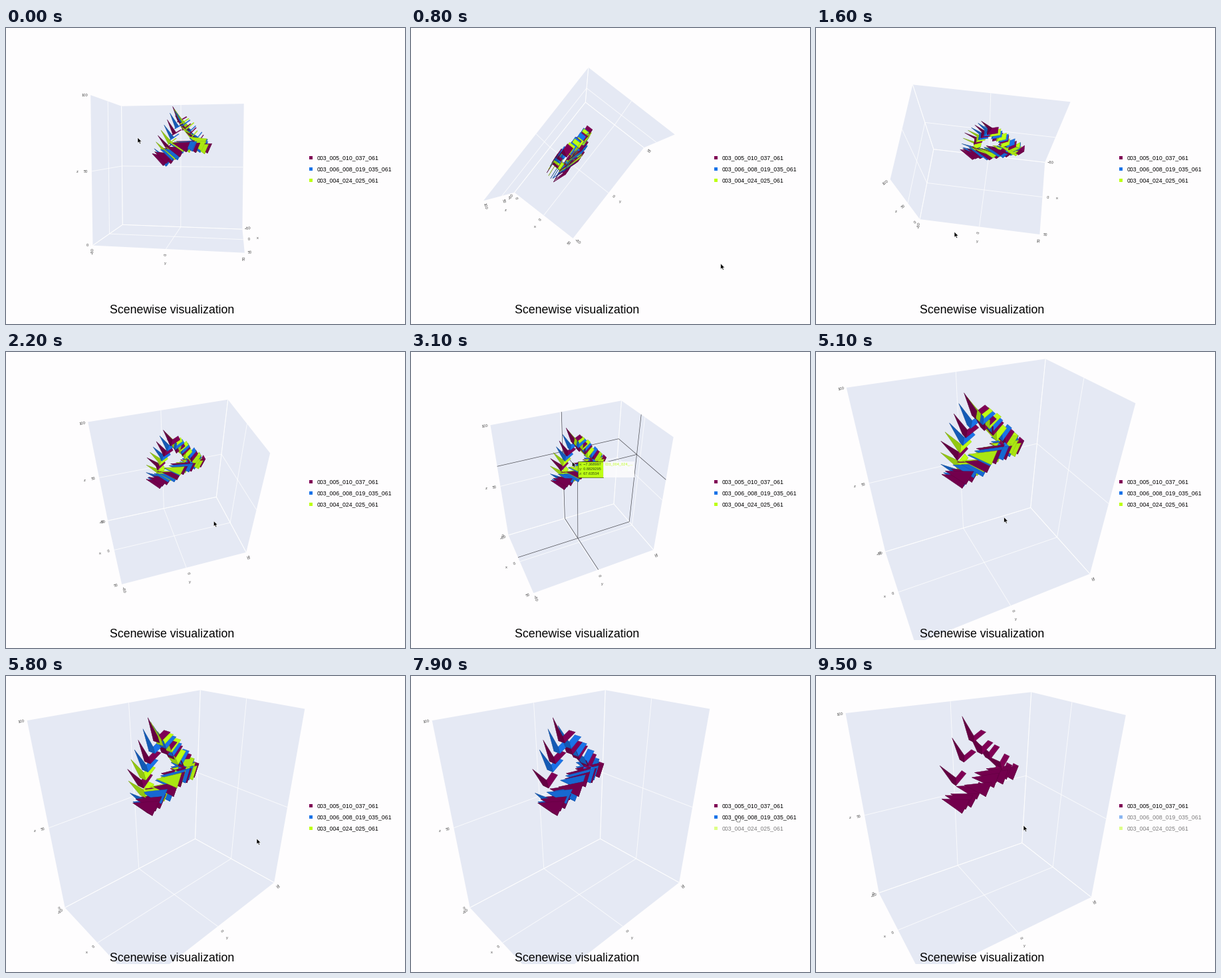
Recreate the animation shown at these times as a matplotlib script. Size 600 by 446 pixels, loop 9600 ms.

```python
import numpy as np
import matplotlib.pyplot as plt
from matplotlib.animation import FuncAnimation
from matplotlib.collections import LineCollection, PolyCollection
from matplotlib.colors import to_rgb
from matplotlib.patches import Polygon, Rectangle

W, H, DPI, STEP, FRAMES = 600, 446, 100, 100, 96
PX = 72 / DPI
SERIES = {"maroon": "#800055", "blue": "#1a73e8", "green": "#bdff14"}
NAMES = ["003_005_010_037_061", "003_006_008_019_035_061", "003_004_024_025_061"]
HIDDEN_AT = {"maroon": 1e9, "blue": 8700, "green": 7400}

# ---- pointer path; the turntable camera follows it while dragging ----
PATH = np.array([
    (100, 198, 165), (700, 473, 330), (1000, 451, 405), (1600, 208, 307), (2400, 347, 237),
    (2800, 243, 165), (4400, 239, 165), (4600, 206, 188), (5200, 298, 261), (5800, 377, 245),
    (6100, 377, 245), (7000, 488, 229), (7400, 490, 211), (8700, 490, 211), (8900, 363, 226),
    (9200, 322, 226), (9300, 322, 226), (9500, 312, 225)])
DRAGS = [(0, 2400), (5200, 5800), (8900, 9500)]
CENTRE, FOCAL = np.array([253, 212.5]), 534.8
BOX = np.array([0.645, 1, 1])


def pointer_at(t):
    return np.array([np.interp(t, PATH[:, 0], PATH[:, i]) for i in (1, 2)])


class Camera:
    def __init__(self, t):
        dx, dy = sum(pointer_at(np.clip(t, a, b)) - pointer_at(a) for a, b in DRAGS)
        az = np.radians(9.6 - 0.23 * dx)
        el = np.radians(np.clip(3.6 + 0.46 * dy, 0, 89))
        zoom = np.clip((t - 3100) / 900, 0, 1)
        self.distance = 5.18 * (3.503 / 5.18) ** zoom
        ca, sa, ce, se = np.cos(az), np.sin(az), np.cos(el), np.sin(el)
        self.axes = np.array([(-sa, ca, 0), (se * ca, se * sa, -ce), (ce * ca, ce * sa, se)])
        self.near = 1 if sa > 0 else -1

    def project(self, points):
        """Pixels and depth of points in box units (-1 to 1 on each axis)."""
        q = np.asarray(points, float) * BOX @ self.axes.T
        depth = self.distance - q[..., 2]
        return CENTRE + FOCAL * q[..., :2] / depth[..., None], depth


# ---- markers: a thin spike and a flap, strung along a closed loop ----
LOOP_U = [0, 0.26, 0.64, 1, 2, 3, 5, 6, 7]
LOOP = np.array([  # x, y, z, spike angle
    (-.30, .01, .70, 109), (-.34, -.08, .50, 110), (-.33, -.18, .28, 122),
    (-.22, -.19, .02, 135), (-.21, -.01, .13, 140), (-.17, .15, .25, 148),
    (-.29, .46, .24, 146), (-.26, .19, .50, 125), (-.30, .03, .68, 110)])
facets = []


def facet(series, shade, verts):
    facets.append((series, np.array(verts) / BOX, np.array(to_rgb(SERIES[series])) * shade))


def polar(length, degrees, dx=0):
    a = np.radians(degrees)
    return np.array([dx, length * np.cos(a), length * np.sin(a)])


def marker(series, u, shift=0):
    x, y, z, angle = (np.interp(u, LOOP_U, column) for column in LOOP.T)
    base = np.array([x, y, z]) + shift
    across = np.array([0.09, 0, 0])
    tip = base + polar(0.25, angle, 0.03)
    end = base + polar(0.155, angle - 80)
    facet(series, 0.78, [tip, base, base + across, base + 0.4 * (end - base)])
    facet(series, 1, [base, end, end + across, base + across])
    if 0.95 < u < 5.5:
        facet(series, 0.9, [tip, end + across, base + across])


for u, name in zip(np.linspace(0, 0.88, 8), "maroon blue maroon blue green maroon green blue".split()):
    marker(name, u)
rng = np.random.default_rng(4)
for i, u in enumerate(np.linspace(1, 6.85, 36)):
    name = list(SERIES)[i % 3]
    if u < 1.5 and i % 2 == 0:
        name = "maroon"
    marker(name, u, rng.uniform(-0.025, 0.025, 3))

# ---- stage ----
plt.rcParams["font.family"] = "Liberation Sans"
fig = plt.figure(figsize=(W / DPI, H / DPI), dpi=DPI, facecolor="#fefdfe")
ax = fig.add_axes([0, 0, 1, 1])
ax.set(xlim=(0, W), ylim=(H, 0))
ax.axis("off")
window = Rectangle((0, 0), W, 434, transform=ax.transData)


def text(x, y, s, px, **kw):
    return ax.text(x, y, s, fontsize=px * PX, **kw)


def layer(artist):
    ax.add_collection(artist, autolim=False)
    artist.set_clip_path(window)
    return artist


walls = layer(PolyCollection([], facecolors="#e5e9f4", edgecolors="none", zorder=1))
grid = layer(LineCollection([], colors="white", linewidths=PX, alpha=0.75, zorder=2))
spikes = layer(LineCollection([], colors="#4a4a50", linewidths=0.7 * PX, zorder=3))
meshes = layer(PolyCollection([], linewidths=0.4 * PX, zorder=4))

TICK_TEXT = {"x": ["−50", "0", "50", "x"], "y": ["−50", "0", "50", "y"], "z": ["0", "50", "100", "z"]}
ticks = {axis: [text(0, 0, s, 5.8, color="#444", ha="center", va="center",
                     rotation_mode="anchor", zorder=5) for s in labels]
         for axis, labels in TICK_TEXT.items()}

text(155.7, 429.7, "Scenewise visualization", 17.7, color="black", zorder=8)
legend = {}
for row, (name, label) in enumerate(zip(SERIES, NAMES)):
    y = 195.3 + 17.2 * row
    box = ax.add_patch(Rectangle((456, y - 2.7), 5.4, 5.4, fc=SERIES[name], ec="none", zorder=6))
    legend[name] = box, text(467.4, y + 2.9, label, 8.8, color="black", zorder=6)

HOVERS = [  # start, end, series, x, y, z
    (2800, 3600, "green", -7.368997, 0.8829295, 67.63534),
    (3600, 4500, "maroon", -9.286622, -0.6715211, 66.31049),
    (4500, 5100, "maroon", -6.120348, -16.20417, 56.10732),
]
tip_box = ax.add_patch(Rectangle((0, 0), 38, 24, lw=0.6 * PX, zorder=9))
tip_side = ax.add_patch(Rectangle((0, 0), 47, 24, fc="#fdfdfe", ec="none", alpha=0.85, zorder=9))
tip_rows = [text(0, 0, "", 5.6, va="center", zorder=10) for _ in "xyz"]
tip_name = text(0, 0, "", 5.6, va="center", zorder=10)

ARROW = np.array([(0, 0), (0, 8.4), (1.9, 6.7), (3.3, 9.6), (4.7, 9), (3.4, 6.2), (6, 6.1)])
HAND = np.array([(0, 0), (1.4, 0), (1.5, 3.2), (5.6, 4), (4.6, 9), (0.6, 9), (-2, 5.4), (0, 5.8)])
pointer = ax.add_patch(Polygon(ARROW, closed=True, lw=0.6 * PX, zorder=12))


def wall_lines(p, side):
    x, y, z = p
    return [[(-1, y, -1), (-1, y, 1)], [(-1, -1, z), (-1, 1, z)],
            [(x, side, -1), (x, side, 1)], [(-1, side, z), (1, side, z)],
            [(x, -1, -1), (x, 1, -1)], [(-1, y, -1), (1, y, -1)]]


def draw_axes(cam):
    centre, near = cam.project((0, 0, 0))[0], cam.near
    edges = {"x": [(v, near, -1) for v in (-1, 0, 1)],
             "y": [(1, v, -1) for v in (-1, 0, 1)],
             "z": [(near, -1, v) for v in (-1, 0, 1)]}
    for axis, points in edges.items():
        q = cam.project(points)[0]
        dx, dy = q[2] - q[0]
        out = np.array([-dy, dx]) / max(np.hypot(dx, dy), 1e-6)
        if out @ (q[1] - centre) < 0:
            out = -out
        angle = (np.degrees(np.arctan2(-out[1], out[0])) + 90) % 180 - 90
        for label, spot in zip(ticks[axis], [*(q + 8.5 * out), q[1] + 22 * out]):
            title = label.get_text() == axis
            label.set(position=spot, visible=spot[1] < 432, rotation=0 if title else angle)


def draw_hover(cam, t):
    hover = next((h for h in HOVERS if h[0] <= t < h[1]), None)
    for part in (tip_box, tip_side, tip_name, *tip_rows):
        part.set_visible(hover is not None)
    if hover is None:
        spikes.set_segments([])
        return
    name, *values = hover[2:]
    x, y, z = p = values[0] / 50, values[1] / 50, values[2] / 50 - 1
    drops = [[p, (-1, y, z)], [p, (x, -cam.near, z)], [p, (x, y, -1)]]
    spikes.set_segments(list(cam.project(wall_lines(p, -cam.near) + drops)[0]))
    left, top = cam.project(p)[0] + (1, -12)
    ink = "#2c3a10" if name == "green" else "white"
    tip_box.set(xy=(left, top), facecolor=SERIES[name], edgecolor=ink)
    tip_side.set_xy((left + 38, top))
    for i, (row, axis, value) in enumerate(zip(tip_rows, "xyz", values)):
        row.set(position=(left + 1.5, top + 4.6 + 7.3 * i), color=ink,
                text=f"{axis}: {value:.7g}".replace("-", "−"))
    label = dict(zip(SERIES, NAMES))[name][:12] + "..."
    tip_name.set(position=(left + 40, top + 4.6), text=label, color=SERIES[name])


def draw(frame):
    t = frame * STEP
    cam = Camera(t)
    side = -cam.near

    faces = [[(-1, -1, -1), (-1, 1, -1), (-1, 1, 1), (-1, -1, 1)],
             [(-1, side, -1), (1, side, -1), (1, side, 1), (-1, side, 1)],
             [(-1, -1, -1), (1, -1, -1), (1, 1, -1), (-1, 1, -1)]]
    walls.set_verts(list(cam.project(faces)[0]))
    lines = wall_lines((0, 0, 0), side) + wall_lines((-1, side, -1), side)
    grid.set_segments(list(cam.project(lines)[0]))
    draw_axes(cam)
    draw_hover(cam, t)

    shown = []
    for name, verts, color in facets:
        if t < HIDDEN_AT[name]:
            flat, depth = cam.project(verts)
            shown.append((depth.mean(), flat, color))
    shown.sort(key=lambda item: -item[0])
    meshes.set_verts([item[1] for item in shown])
    meshes.set_facecolor([item[2] for item in shown])
    meshes.set_edgecolor([item[2] * 0.8 for item in shown])

    for name, parts in legend.items():
        for part in parts:
            part.set_alpha(1 if t < HIDDEN_AT[name] else 0.5)

    hand = 6900 <= t < 8700
    pointer.set_xy((HAND if hand else ARROW) + pointer_at(t))
    pointer.set(facecolor="white" if hand else "black", edgecolor="#444" if hand else "white")


anim = FuncAnimation(fig, draw, frames=FRAMES, interval=STEP, repeat=True, repeat_delay=0)
plt.show()
```
